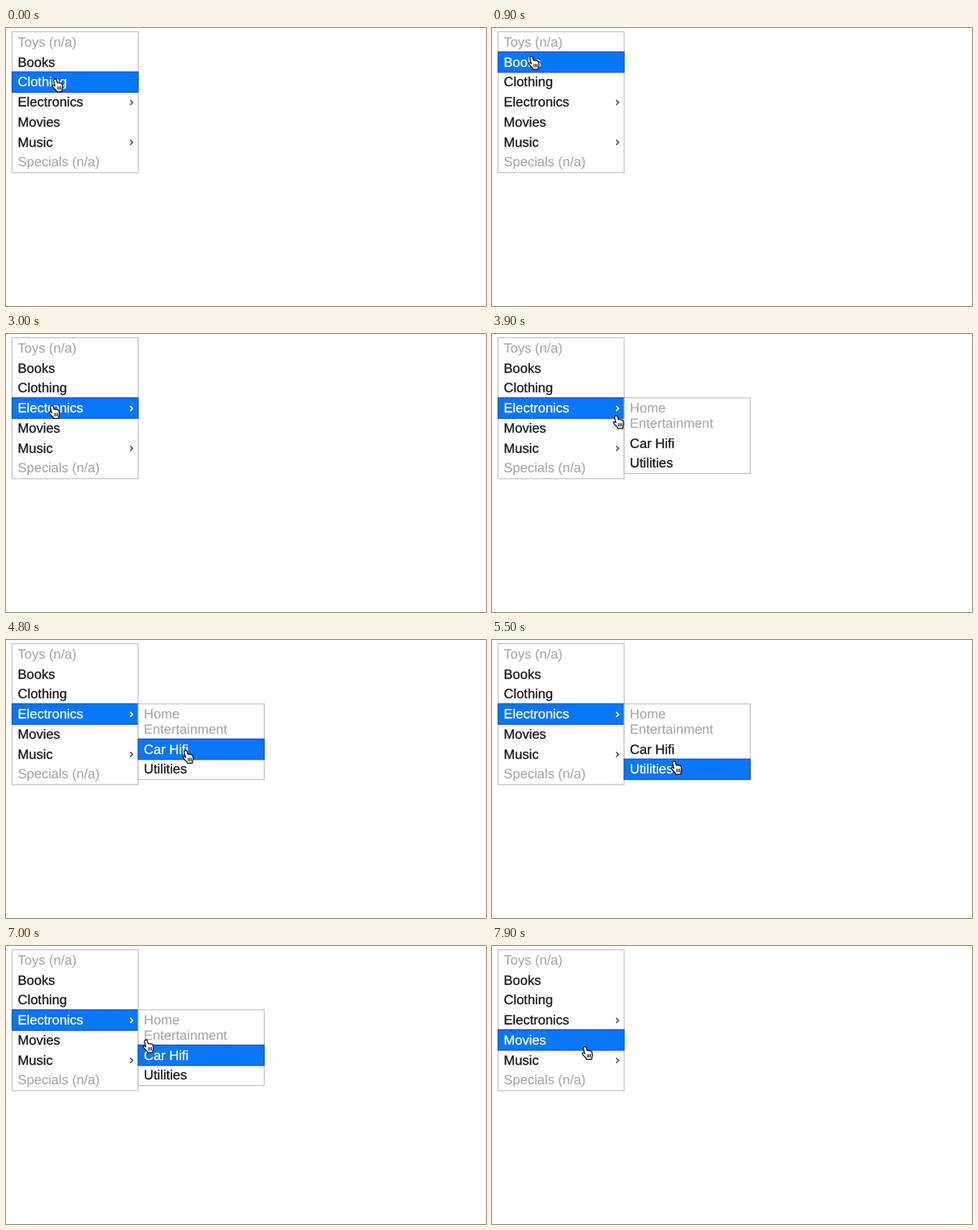
Animation of 592x344 px, one loop 8 s. Source, as an HTML page:

```html
<!DOCTYPE html>
<html lang="en">
<head>
<meta charset="utf-8">
<title>Menu</title>
<style>
  html, body { margin: 0; width: 100%; height: 100%; overflow: hidden; background: #fff; }
  svg { display: block; }
  text {
    font: 16.5px "Liberation Sans", Arial, sans-serif; text-rendering: geometricPrecision;
    color: #151515; fill: currentColor; stroke: currentColor; stroke-width: .28;
  }
  .off text { color: #a6a6a6; stroke-width: .1; }
  .on text { color: #fff; }
  .frame { fill: #fff; stroke: #c2c2c2; stroke-width: 1.2; }
  .bar { fill: #0877f8; stroke: #1746d4; stroke-width: 1.1; visibility: hidden; }
  .on .bar { visibility: visible; }
  .arrow { fill: none; stroke: #555; stroke-width: 1.6; }
  .on .arrow { stroke: #fff; }
</style>
</head>
<body>
<svg width="592" height="344" viewBox="0 0 592 344">
  <g id="main"></g>
  <g id="sub"></g>
  <g id="hand" stroke="#111" stroke-linejoin="round" stroke-linecap="round">
    <path fill="#fff" stroke-width="1.25" d="M3.2 .9C4.2 .1 5.5 .6 5.8 1.8L6.9 5.5Q7.9 4.7 8.9 5.5Q9.9 4.9 10.8 5.9Q12.1 5.6 12.6 6.8L13.3 10.2Q13.5 12.2 12.6 13.8L12.4 16.4H6L5.6 14.8Q3.5 13.1 1.6 10.6Q.2 9 1.2 8.3Q2.3 7.7 3.9 9.3L2.3 3Q2 1.5 3.2 .9Z"/>
    <path fill="none" d="M7.2 10.2l.3 3.4M9.1 10.1l.2 3.4M11 10l.1 3.4"/>
  </g>
  <path id="pointer" d="M0 0V13.2L3 10.4L5.3 15.4L7.4 14.5L5.2 9.7H9.4Z" fill="#000" stroke="#fff" stroke-width=".8" paint-order="stroke"/>
</svg>
<script>
const LOOP = 8000, STEP = 100, DELAY = 300;
const PITCH = 24.7, LINE = 18.6, WIDTH = 155.5;
const ELECTRONICS = 3;
const $ = id => document.getElementById(id);

function add(parent, tag, attrs, label) {
  const el = document.createElementNS("http://www.w3.org/2000/svg", tag);
  for (const k in attrs) el.setAttribute(k, attrs[k]);
  if (label) el.textContent = label;
  return parent.appendChild(el);
}

// Marks in a label: "-" disabled, ">" has a submenu, "|" line break.
function buildMenu(box, x, top, height, labels) {
  add(box, "rect", { class: "frame", x, y: top, width: WIDTH, height });
  let mid = top + 12.7;
  return labels.map(spec => {
    const row = add(box, "g", { class: spec[0] === "-" ? "off" : "" });
    const lines = spec.replace(/[->]/g, "").split("|");
    const extra = (lines.length - 1) * LINE;
    add(row, "rect", { class: "bar", x, y: mid - 12.5, width: WIDTH, height: 25.4 + extra });
    lines.forEach((s, i) => add(row, "text", { x: x + 7.1, y: mid + 5.7 + i * LINE }, s));
    if (spec.endsWith(">"))
      add(row, "path", { class: "arrow", d: `M${x + 145.6} ${mid - 2.3}l3.1 3.1l-3.1 3.1` });
    mid += PITCH + extra;
    return row;
  });
}

const mainRows = buildMenu($("main"), 7.5, 4.6, 174.4,
  ["-Toys (n/a)", "Books", "Clothing", "Electronics>", "Movies", "Music>", "-Specials (n/a)"]);
const subRows = buildMenu($("sub"), 163, 79, 93.6,
  ["-Home|Entertainment", "Car Hifi", "Utilities"]);

// Eased cursor moves: start, end, x, y. It rests in between.
const home = [56.5, 62.5];
const moves = [
  [0, 300, 58, 17], [600, 1000, 42, 38], [1300, 1900, 60, 46], [2000, 2200, 54, 60],
  [2200, 3000, 52.5, 88], [3000, 3800, 78, 90], [3800, 4000, 220, 111], [4300, 4800, 217.5, 136],
  [5200, 5700, 222, 157], [6200, 6500, 228, 182], [6500, 7000, 168.5, 115.5],
  [7000, 7100, 152, 113], [7200, 7900, 110.5, 124]
];

// Highlights: time, main row, submenu row
const focus = [
  [0, 2], [200, 1], [2300, 2], [3000, ELECTRONICS], [4500, ELECTRONICS, 1],
  [5500, ELECTRONICS, 2], [6800, ELECTRONICS, 1], [7100, 4]
];

const ease = k => k * k * (3 - 2 * k);
const clamp = k => Math.min(1, Math.max(0, k));

function cursorAt(t) {
  let [x, y] = home;
  for (const [start, end, toX, toY] of moves) {
    const k = ease(clamp((t - start) / (end - start)));
    x += (toX - x) * k;
    y += (toY - y) * k;
  }
  return [x, y];
}

const focusAt = t => focus.filter(f => f[0] <= t).pop();
const mark = (rows, n) => rows.forEach((r, i) => r.classList.toggle("on", i === n));
const show = (el, yes) => { el.style.display = yes ? "" : "none"; };

function draw(time) {
  const t = Math.floor((time % LOOP) / STEP) * STEP;
  const [x, y] = cursorAt(t);
  const [, mainRow, subRow] = focusAt(t);
  const outside = x > 163 && y > 173;
  mark(mainRows, mainRow);
  mark(subRows, subRow);
  // The submenu opens and closes a little after the highlight.
  show($("sub"), focusAt(Math.max(0, t - DELAY))[1] === ELECTRONICS);
  for (const id of ["hand", "pointer"]) $(id).setAttribute("transform", `translate(${x} ${y})`);
  show($("hand"), !outside);
  show($("pointer"), outside);
}

const start = performance.now();
function tick() {
  draw(performance.now() - start);
  requestAnimationFrame(tick);
}
tick();
</script>
</body>
</html>
```
